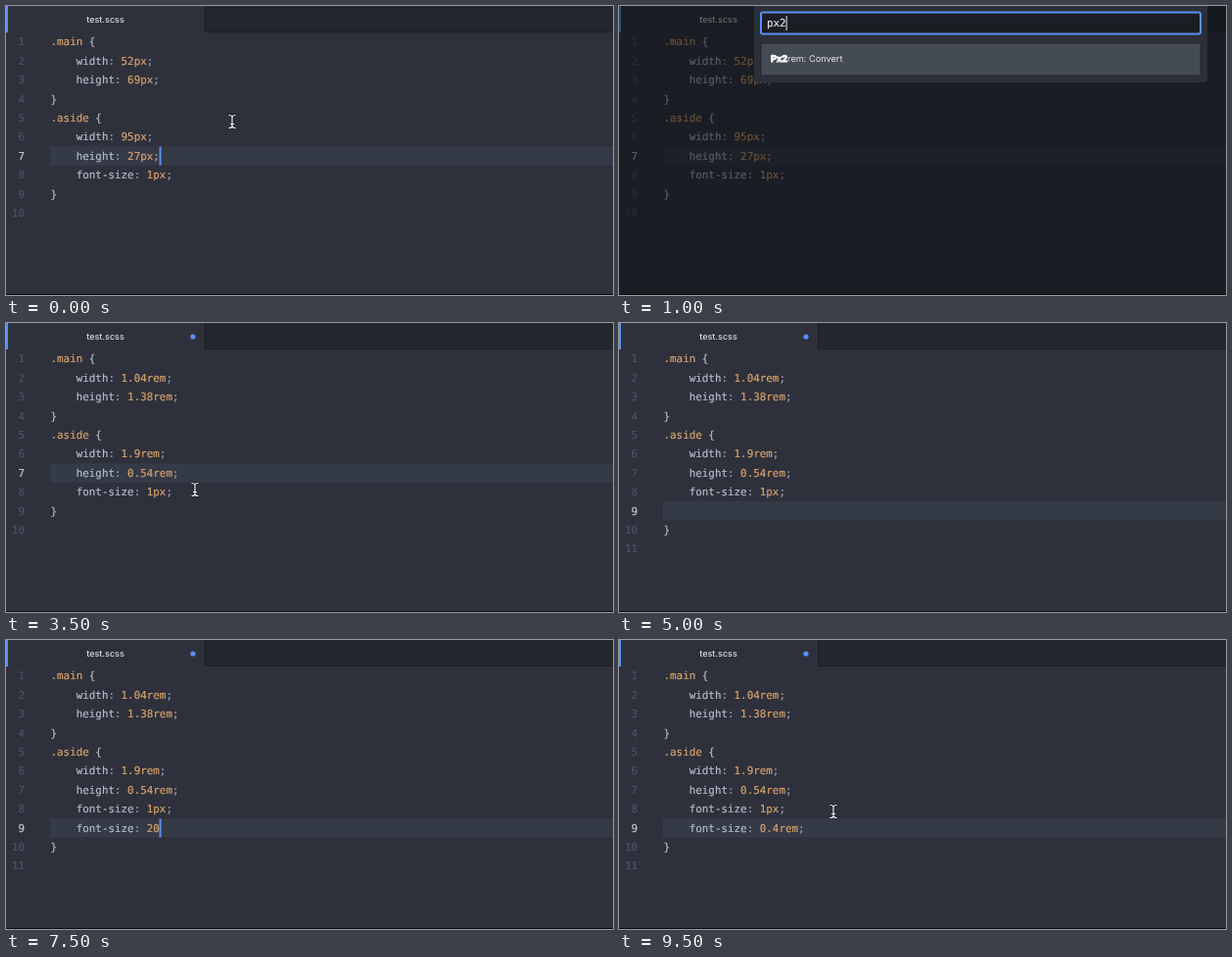
Write an HTML page that moves like this. It is 620 px wide and 295 px high and loops after 10000 ms.

```html
<!DOCTYPE html>
<html lang="en">
<head>
<meta charset="utf-8">
<title>test.scss</title>
<style>
html, body { margin: 0; width: 100%; height: 100%; overflow: hidden; background: #2e313c; }
svg { display: block; width: 620px; height: 295px; }
text { white-space: pre; text-rendering: geometricPrecision; }
.mono { font: 10.88px "DejaVu Sans Mono", "Liberation Mono", monospace; stroke-width: .2px; }
.ui { font-family: Inter, "Open Sans", sans-serif; }
</style>
</head>
<body>
<svg id="stage" viewBox="0 0 620 295" xmlns="http://www.w3.org/2000/svg"></svg>
<script>
const STEP = 500, LOOP = 10000;
const CHAR = 6.55, LINE = 19.4, TOP = 27, LEFT = 45.5;
const C = {
  bg: '#2e313c', bar: '#23282e', row: '#343a46', text: '#b4bac6', num: '#4d5261',
  lit: '#c3c8d2', value: '#d8a26b', punct: '#989ead', blue: '#5a8ff5'
};

const rect = (x, y, w, h, fill, more = '') =>
  `<rect x="${x}" y="${y}" width="${w}" height="${h}" fill="${fill}" ${more}/>`;
const span = (s, fill, more = '') => `<tspan fill="${fill}" stroke="${fill}" ${more}>${s}</tspan>`;
const mono = (x, y, body, more = '') => `<text class="mono" x="${x}" y="${y}" ${more}>${body}</text>`;
const ui = (x, y, size, body, fill, more = '') =>
  `<text class="ui" x="${x}" y="${y}" font-size="${size}" fill="${fill}" ${more}>${body}</text>`;
const lineTop = n => TOP + (n - 1) * LINE;
const colX = n => LEFT + n * CHAR;

// One source line, coloured by its parts
function code(s) {
  if (s[0] === '.') return span(s.slice(0, -2), C.value) + span(' {', C.text);
  const m = s.match(/^(\s*[\w-]+)(: ?)([\w.]*)(;?)$/);
  if (!m) return span(s, s.trim() === 'fz' ? '#fff' : C.text);
  return span(m[1], C.text) + span(m[2], C.punct) + span(m[3], C.value) + span(m[4], C.punct);
}

const px = ['52px', '69px', '95px', '27px'];
const rem = ['1.04rem', '1.38rem', '1.9rem', '0.54rem'];
const pad = '    ';

function sheet(v, extra) {
  const list = ['.main {', `${pad}width: ${v[0]};`, `${pad}height: ${v[1]};`, '}',
    '.aside {', `${pad}width: ${v[2]};`, `${pad}height: ${v[3]};`, `${pad}font-size: 1px;`];
  if (extra !== undefined) list.push(pad + extra);
  return [...list, '}', ''];
}

// line: active row, on: caret shown, add: text of the new row
const before = { v: px, line: 7, on: 1 };
const done = { v: rem, line: 7, dot: 1 };
const fresh = { v: rem, line: 9, dot: 1, on: 1, add: '' };
const steps = [
  { ...before, mouse: [231, 118] },
  { ...before, on: 0, query: '' },
  { ...before, on: 0, query: 'px2' },
  { ...done, dot: 0, on: 1 },
  done,
  { ...done, on: 1, mouse: [195, 168] },
  { ...done, mouse: [194, 168] },
  { ...done, mouse: [193, 170] },
  { ...done, line: 8, on: 1, mouse: [192, 170] },
  fresh,
  { ...fresh, on: 0 },
  fresh,
  { ...fresh, add: 'fz', menu: 'props' },
  { ...fresh, add: 'font-size: ' },
  { ...fresh, add: 'font-size: 2' },
  { ...fresh, add: 'font-size: 20' },
  { ...fresh, add: 'font-size: 20px', menu: 'value' },
  { ...fresh, add: 'font-size: 0.4rem' },
  { ...fresh, add: 'font-size: 0.4rem;' },
  { ...fresh, on: 0, add: 'font-size: 0.4rem;', mouse: [219, 175] }
];

function tabs(s) {
  return rect(0, 0, 620, 27, C.bar) + rect(0, 26, 620, 1, '#1d2127') +
    rect(0, 0, 203, 27, C.bg) + rect(203, 0, 1, 26, '#1b1f24') + rect(0, 0, 2, 27, C.blue) +
    ui(101.5, 17, 9, 'test.scss', '#d7dae0', 'text-anchor="middle" font-weight="500"') +
    (s.dot ? `<circle cx="191" cy="14" r="2.6" fill="${C.blue}"/>` : '');
}

function editor(s) {
  const lines = sheet(s.v, s.add);
  let out = rect(45, lineTop(s.line), 575, LINE, C.row);
  if (s.add === 'fz') out += rect(colX(4), lineTop(9) + 2.5, CHAR * 2, 14.5, '#e0524f');
  lines.forEach((t, i) => {
    const y = lineTop(i + 1) + 13.3;
    out += mono(19, y, span(i + 1, i + 1 === s.line ? C.lit : C.num), 'text-anchor="end"');
    out += mono(LEFT, y, code(t));
  });
  if (s.on) out += rect(colX(lines[s.line - 1].length) - .3, lineTop(s.line), 2, LINE, C.blue);
  return out;
}

function icon(x, y, letter, fill) {
  return rect(x, y, 22, 22, fill) + mono(x + 11, y + 14.5, span(letter, '#b9bec8'), 'text-anchor="middle"');
}

// Completion text with the matched letters in bold
const match = s => s.replace(/^f|z|[^fz]+/g, t =>
  t.length > 1 || !/[fz]/.test(t) ? span(t, '#c6cad3') : span(t, '#fff', 'font-weight="700"'));

function menu(kind) {
  if (kind === 'value')
    return rect(114, 201, 193, 22, '#454b57') + icon(114, 201, 'v', '#5c6069') +
      mono(colX(15), 215.3, span('0.4rem', '#e1e4ea'));
  return rect(42, 201, 578, 65, '#2b2e38') + rect(42, 201, 578, 21.5, '#454b57') +
    rect(42, 244, 578, 1, '#363a45') + icon(42, 201, 'p', '#5c6069') + icon(42, 222.5, 'p', '#444953') +
    mono(colX(4), 215.3, match('font-size')) + mono(colX(4), 237, match('font-size-adjust')) +
    ui(49, 260, 10.7, 'Specifies the size of the font.', '#b4bac6') +
    ui(206, 260, 10.7, 'More..', '#6b9bf7');
}

const commands = ['Application: About', 'Application: Add Project Folder', 'Application: Hide',
  'Application: Install Update', 'Application: Minimize', 'Application: New File',
  'Application: New Window', 'Application: Open'];

function palette(q) {
  const open = q === '';
  let out = rect(0, 0, 620, 295, '#0a0d10', 'opacity=".55"') +
    rect(138, -6, 463, open ? 310 : 84, '#2c3039', 'rx="3"') +
    rect(145, 6.5, 449, 22, '#1b1e24', `rx="2" stroke="${C.blue}" stroke-width="2"`) +
    mono(151, 21, span(q, '#e1e4ea')) + rect(151 + q.length * CHAR, 10, 1, 15, '#e1e4ea');
  const names = open ? commands : [span('Px2', '#fff', 'font-weight="700" stroke="none"') + 'rem: Convert'];
  names.forEach((t, i) => {
    const y = 38 + i * 33;
    out += rect(145, y, 449, 33, i ? '#31353f' : '#454b55', 'stroke="#23272e"') +
      ui(155, y + 19.2, 9.2, t, '#dfe2e8');
  });
  return out;
}

function pointer([x, y]) {
  const d = `M${x - 3.5} ${y - 6.5}q3.5 0 3.5 2v9q0 2 -3.5 2M${x + 3.5} ${y - 6.5}q-3.5 0 -3.5 2v9q0 2 3.5 2M${x - 2} ${y + 2.5}h4`;
  return `<path d="${d}" fill="none" stroke="#1c1e25" stroke-width="2.6"/>` +
    `<path d="${d}" fill="none" stroke="#f1f2f4" stroke-width="1.2"/>`;
}

function scene(s) {
  return rect(0, 0, 620, 295, C.bg) + tabs(s) + editor(s) + rect(0, 294, 620, 1, '#0b0c0f') +
    (s.menu ? menu(s.menu) : '') + (s.query !== undefined ? palette(s.query) : '') +
    (s.mouse ? pointer(s.mouse) : '');
}

const stage = document.getElementById('stage');
const start = performance.now();
let shown = -1;
function tick() {
  const t = Math.max(0, performance.now() - start) % LOOP;
  const i = Math.floor(t / STEP);
  if (i !== shown) stage.innerHTML = scene(steps[shown = i]);
  requestAnimationFrame(tick);
}
tick();
</script>
</body>
</html>
```
